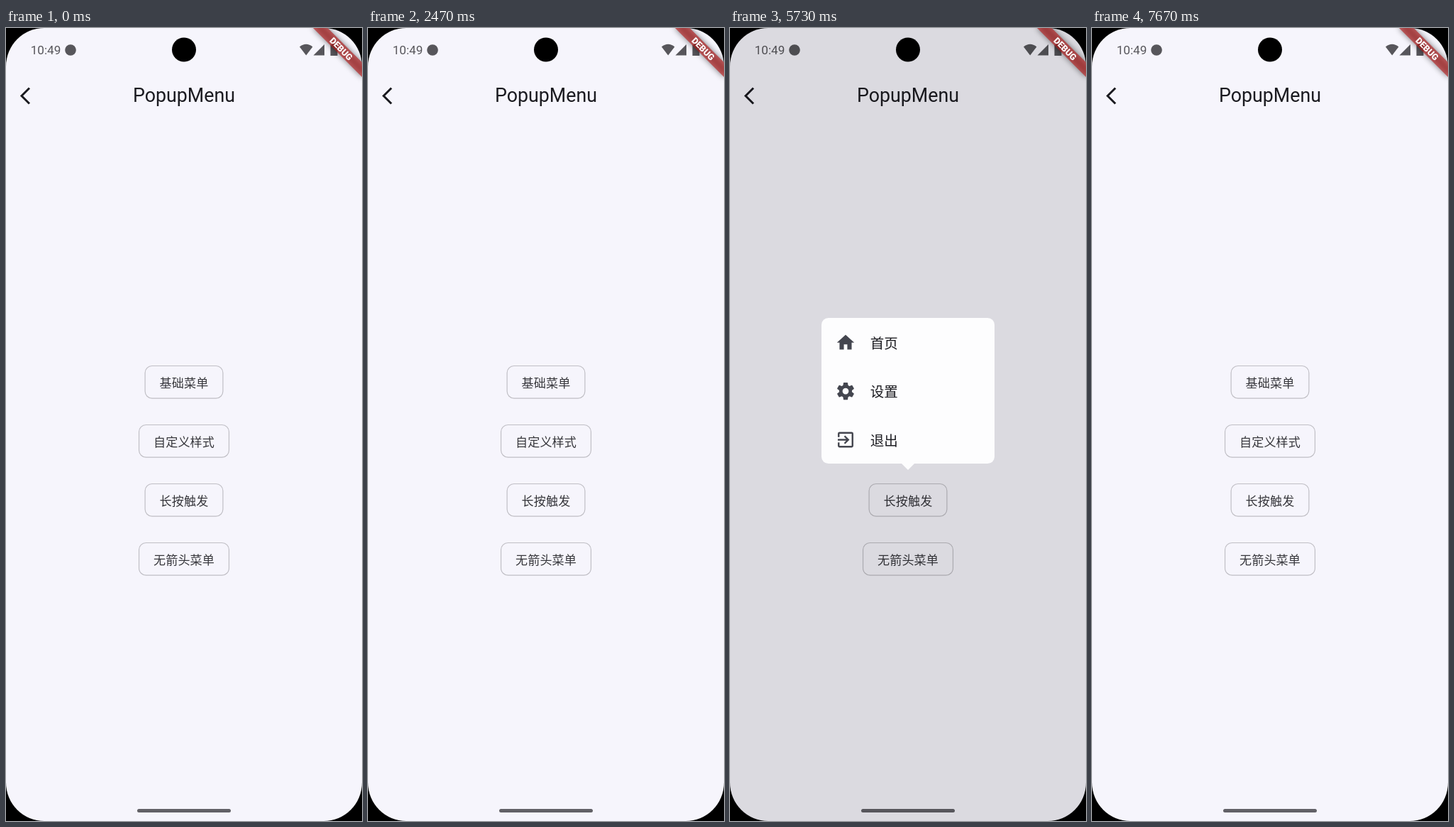
These frames come from a looping animation (502 by 1116 pixels, 8270 ms). An HTML page:

```html
<!DOCTYPE html>
<html lang="zh-CN">
<head>
<meta charset="utf-8">
<title>PopupMenu</title>
<style>
  html, body { margin: 0; width: 100%; height: 100%; overflow: hidden; background: #000; }
  svg { display: block; width: 502px; height: 1116px; }
  text { font: 17.1px Roboto, "Noto Sans CJK SC", "Noto Sans CJK", sans-serif; fill: #1b1b20; }
  .mid { text-anchor: middle; }
  .label text { font-weight: 500; fill: #36363b; letter-spacing: .12px; }
  .label rect { fill: none; stroke: #c0bfc5; stroke-width: 1.2; }
  .item text { font-size: 19.5px; }
  .menu { display: none; }
</style>
</head>
<body>
<svg viewBox="0 0 502 1116">
  <defs>
    <clipPath id="screen"><rect width="502" height="1116" rx="54"/></clipPath>
    <filter id="soft" x="-30%" y="-150%" width="160%" height="400%"><feGaussianBlur stdDeviation="4.4"/></filter>
    <filter id="drop" x="-10%" y="-20%" width="120%" height="150%"><feGaussianBlur stdDeviation="7"/></filter>
    <g id="icons" fill="#44464f">
      <path id="home" d="M10 20v-6h4v6h5v-8h3L12 3 2 12h3v8z"/>
      <g id="gear">
        <circle cx="12" cy="12" r="5.5" fill="none" stroke="#44464f" stroke-width="3.8"/>
        <g id="teeth">
          <path id="tooth" d="M10.1 2h3.8q.5 0 .6.5l.6 4.3h-6.2l.6-4.3q.1-.5.6-.5z"/>
        </g>
      </g>
      <path id="exit" d="M10.09 15.59L11.5 17l5-5-5-5-1.41 1.41L12.67 11H3v2h9.67zM19 3H5a2 2 0 0 0-2 2v4h2V5h14v14H5v-4H3v4a2 2 0 0 0 2 2h14a2 2 0 0 0 2-2V5a2 2 0 0 0-2-2z"/>
      <path id="star" d="M12 17.27L18.18 21l-1.64-7.03L22 9.24l-7.19-.61L12 2 9.19 8.63 2 9.24l5.46 4.73L5.82 21z"/>
      <g id="share">
        <path d="M18 5L6 12l12 7" fill="none" stroke="#44464f" stroke-width="2"/>
        <circle cx="18" cy="5" r="3"/><circle cx="6" cy="12" r="3"/><circle cx="18" cy="19" r="3"/>
      </g>
    </g>
  </defs>

  <g clip-path="url(#screen)">
    <rect width="502" height="1116" fill="#f6f5fc"/>
    <g fill="#57565b">
      <text x="34.7" y="37" style="fill:#57565b">10:49</text>
      <circle cx="91" cy="31" r="7.8"/>
      <path d="M414 26.5Q423.2 19 432.4 26.5L423.2 38.5z"/>
      <path d="M449 23v15.5h-15.5z"/>
      <path d="M460 22h5v1.6h2.5V39h-10V23.6h2.5z"/>
    </g>
    <path d="M33 84.5L22 95.5l11 11" fill="none" stroke="#1b1b20" stroke-width="3"/>
    <text class="mid" x="251" y="104.3" style="font-size:26.8px">PopupMenu</text>
    <g id="buttons"></g>
    <rect x="185" y="1099" width="132" height="5" rx="2.5" fill="#626167"/>
    <rect id="dim" class="menu" width="502" height="1116" fill-opacity=".11"/>

    <g id="basic" class="menu"></g>

    <g id="custom" class="menu">
      <path d="M239 515h24l-12 12z" fill="#fff"/>
      <rect x="37" y="331" width="428.5" height="191" rx="19.5" fill-opacity=".3" filter="url(#drop)"/>
      <path d="M239 515h24l-12 12z" fill="#e0dfe5"/>
      <rect x="36.5" y="325" width="429" height="191" rx="19.5" fill="#f6f5fc"/>
      <text class="mid" x="251" y="359.3">自定义菜单</text>
      <path d="M51 364h399" stroke="#dbdae1" stroke-width="1.2"/>
    </g>

    <g id="hold" class="menu"></g>

    <g id="plain" class="menu">
      <rect x="136" y="650" width="230" height="63" rx="9.8" fill="#fdebb0"/>
      <text class="mid" x="251.2" y="688.5" style="letter-spacing:.3px">这是一个没有箭头的菜单</text>
    </g>

    <g transform="translate(502) rotate(45)">
      <rect x="-48.8" y="34.2" width="97.6" height="14.6" fill-opacity=".5" filter="url(#soft)"/>
      <rect x="-48.8" y="34.2" width="97.6" height="14.6" fill="#b71c1c" fill-opacity=".627"/>
      <text class="mid" y="45.9" style="font-size:12.4px;font-weight:900;fill:#fff">DEBUG</text>
    </g>
    <circle cx="251" cy="30.5" r="17"/>
  </g>
</svg>
<script>
const LOOP = 8270;
const $ = id => document.getElementById(id);
const add = (id, markup) => $(id).insertAdjacentHTML('beforeend', markup);

for (let a = 60; a < 360; a += 60) add('teeth', `<use href="#tooth" transform="rotate(${a} 12 12)"/>`);

['基础菜单', '自定义样式', '长按触发', '无箭头菜单'].forEach((label, i) => {
  const y = 498.3 + 83 * i, w = label.length * 17.1 + 41.4;
  add('buttons', `<g class="label">
    <rect x="${251 - w / 2}" y="${y - 22.8}" width="${w}" height="45.6" rx="9.8"/>
    <text class="mid" x="251" y="${y + 7.2}">${label}</text></g>`);
});

function addItems(id, x, y, items) {
  items.forEach(([icon, label], i) => {
    const cy = y + 68.4 * i;
    add(id, `<g class="item">
      <use href="#${icon}" fill="#44464f" transform="translate(${x - 14.64} ${cy - 14.64}) scale(1.22)"/>
      <text x="${x + 34.7}" y="${cy + 8.3}">${label}</text></g>`);
  });
}

function addListMenu(id, top, arrow) {
  add(id, `<path d="${arrow}" fill="#fdfdfe"/>
    <rect x="129" y="${top}" width="244" height="205" rx="9.8" fill="#fdfdfe"/>`);
  addItems(id, 163, top + 34.7, [['home', '首页'], ['gear', '设置'], ['exit', '退出']]);
}

addListMenu('basic', 549.5, 'M241 551l10-10 10 10z');
addListMenu('hold', 408, 'M241 612l10 10 10-10z');
addItems('custom', 85.5, 398.5, [['star', '收藏'], ['share', '分享']]);

// Each menu appears and disappears without a transition.
const shown = { basic: [930, 2130], custom: [3000, 3870], hold: [4930, 5800], plain: [6470, 7130] };

function draw(now) {
  const t = now % LOOP;
  let open = false;
  for (const [id, [from, to]] of Object.entries(shown)) {
    const on = t >= from && t < to;
    $(id).style.display = on ? 'inline' : 'none';
    open ||= on;
  }
  $('dim').style.display = open ? 'inline' : 'none';
  requestAnimationFrame(draw);
}
draw(performance.now());
</script>
</body>
</html>
```
